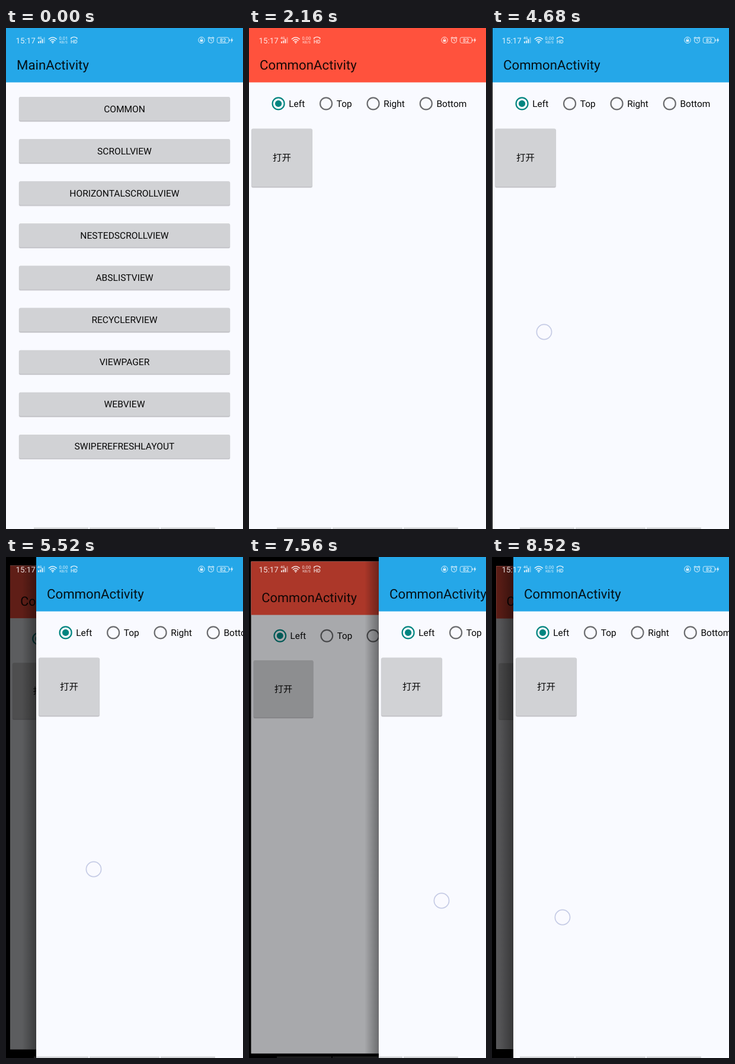
Recreate the animation shown at these times as an HTML page. Size 400 px wide and 844 px high, loop 8640 ms.

```html
<!DOCTYPE html>
<html lang="en">
<head>
<meta charset="utf-8">
<title>Page transitions</title>
<style>
html, body { margin: 0; width: 100%; height: 100%; overflow: hidden; background: #000; }
svg { display: block; width: 400px; height: 844px; }
text { font-family: Roboto, "Noto Sans CJK SC", "Noto Sans CJK", sans-serif; text-rendering: geometricPrecision; }
</style>
</head>
<body>
<svg id="stage" viewBox="0 0 400 844" xmlns="http://www.w3.org/2000/svg">
  <defs>
    <linearGradient id="edge">
      <stop offset="0" stop-color="#000" stop-opacity="0"/>
      <stop offset="1" stop-color="#000" stop-opacity=".36"/>
    </linearGradient>
  </defs>
</svg>
<script>
const LOOP = 8640, STEP = 120, W = 400, H = 844;
const OPEN_MS = 500, TAPS = [{ down: 950, open: 1592 }, { down: 3230, open: 3801 }];
const SWIPE_AT = 4440;
const stage = document.getElementById('stage');

function add(parent, tag, attrs, content) {
  const el = document.createElementNS('http://www.w3.org/2000/svg', tag);
  set(el, attrs);
  if (content !== undefined) el.textContent = content;
  parent.appendChild(el);
  return el;
}

function set(el, attrs) {
  for (const k in attrs) el.setAttribute(k, attrs[k]);
}

function show(el, on) {
  el.setAttribute('display', on ? 'inline' : 'none');
}

const clamp = v => Math.max(0, Math.min(1, v));

// ---- building blocks ----

function button(g, x, y, w, h, label) {
  const box = { x, y, width: w, height: h, rx: 2.2 };
  add(g, 'rect', { x: x - .7, y: y + .2, width: w + 1.4, height: h + 2, rx: 3, fill: '#000', opacity: .08 });
  add(g, 'rect', { x: x - .1, y: y + .6, width: w + .2, height: h + .8, rx: 2.6, fill: '#000', opacity: .17 });
  add(g, 'rect', { ...box, fill: '#d1d2d5' });
  const wave = add(g, 'g', {});
  add(g, 'text', { x: x + w / 2, y: y + h / 2 + 5.6, 'font-size': 15.55, 'text-anchor': 'middle', fill: '#080808' }, label);
  return { box, wave };
}

function ripple(btn, id, cx, cy, reach) {
  const clip = add(stage.querySelector('defs'), 'clipPath', { id });
  add(clip, 'rect', btn.box);
  set(btn.wave, { 'clip-path': `url(#${id})` });
  return { el: add(btn.wave, 'circle', { cx, cy, r: 0 }), reach };
}

function page(title, color) {
  const g = add(stage, 'g', {});
  add(g, 'rect', { width: W, height: H, fill: '#f9faff' });
  add(g, 'rect', { width: W, height: 91.6, fill: color });
  add(g, 'text', { x: 18, y: 69.6, 'font-size': 22.22, fill: '#000', 'fill-opacity': .9 }, title);
  return g;
}

function mainPage() {
  const g = page('MainActivity', '#25a7e8');
  const names = ['COMMON', 'SCROLLVIEW', 'HORIZONTALSCROLLVIEW', 'NESTEDSCROLLVIEW', 'ABSLISTVIEW',
    'RECYCLERVIEW', 'VIEWPAGER', 'WEBVIEW', 'SWIPEREFRESHLAYOUT'];
  const list = names.map((n, i) => button(g, 22.2, 116 + i * 71.11, 355.6, 40, n));
  return { g, first: list[0] };
}

function commonPage(color) {
  const g = page('CommonActivity', color);
  ['Left', 'Top', 'Right', 'Bottom'].forEach((name, i) => {
    const cx = [49.6, 130.1, 209.6, 298.8][i], on = i === 0;
    add(g, 'circle', { cx, cy: 127.4, r: 10, fill: 'none', stroke: on ? '#008580' : '#6b6c6f', 'stroke-width': 2.2 });
    if (on) add(g, 'circle', { cx, cy: 127.4, r: 5.6, fill: '#008580' });
    add(g, 'text', { x: cx + 17.6, y: 133.2, 'font-size': 15.55, fill: '#080808' }, name);
  });
  return { g, first: button(g, 4.4, 169.5, 102.2, 97.8, '打开') };
}

function statusBar() {
  const g = add(stage, 'g', { fill: '#fff', opacity: .85 });
  const label = (x, y, size, s, extra) => add(g, 'text', { x, y, 'font-size': size, ...extra }, s);
  const line = (d, w = 1) => add(g, 'path', { d, fill: 'none', stroke: '#fff', 'stroke-width': w, 'stroke-linecap': 'round' });

  label(16.6, 25.5, 13.3, '15:17');
  label(53, 19, 6, '4G', { 'font-weight': 500 });
  for (let i = 0; i < 4; i++) {
    const h = [3, 4.5, 7, 10][i];
    add(g, 'rect', { x: 54 + i * 3.2, y: 25.6 - h, width: 2, height: h, opacity: i < 3 ? 1 : .45 });
  }
  line('M72.3 18.6Q78.8 12.8 85.3 18.6', 1.5);
  line('M74.6 21.1Q78.8 17.4 83 21.1', 1.5);
  line('M76.8 23.4Q78.8 21.7 80.8 23.4', 1.4);
  add(g, 'circle', { cx: 78.8, cy: 25.2, r: 1.1 });
  const speed = label(97, 19.6, 7.6, '', { 'text-anchor': 'middle' });
  label(97, 26, 6, 'KB/S', { 'text-anchor': 'middle' });
  line('M109.8 18.2V16.9Q114.8 13.4 119.8 16.9V18.2', 1.4);
  label(114.8, 26, 8.6, 'HD', { 'text-anchor': 'middle', 'font-weight': 500 });

  add(g, 'circle', { cx: 330, cy: 20.4, r: 5.2, fill: 'none', stroke: '#fff' });
  add(g, 'rect', { x: 327.6, y: 19.8, width: 4.8, height: 3.4, rx: .5 });
  line('M328.6 19.8V18.8A1.4 1.4 0 0 1 331.4 18.8V19.8', .9);

  add(g, 'circle', { cx: 346, cy: 20.8, r: 4.4, fill: 'none', stroke: '#fff', 'stroke-width': 1.1 });
  line('M346 18.4V21L347.8 22');
  line('M341 17L343.2 15.3M351 17L348.8 15.3', 1.2);

  add(g, 'rect', { x: 356.3, y: 15.9, width: 19.8, height: 9.4, rx: 2.6, fill: 'none', stroke: '#fff', 'stroke-width': .9 });
  add(g, 'rect', { x: 376.6, y: 19, width: 1.2, height: 3.2 });
  label(366.2, 23.9, 9, '82', { 'text-anchor': 'middle', 'font-weight': 500 });
  add(g, 'path', { d: 'M381.8 15.8L378.8 21.2H380.8L380 25.4L383.4 19.6H381.3Z' });
  return speed;
}

// ---- scene ----

add(stage, 'rect', { width: W, height: H });
const home = mainPage();
const red = commonPage('#ff523d');
const scrim = add(stage, 'rect', { width: W, height: H });
const shadow = add(stage, 'rect', { y: 0, width: 24, height: H, fill: 'url(#edge)' });
const blue = commonPage('#25a7e8');
const waves = [ripple(home.first, 'clipA', 250, 143, 370), ripple(red.first, 'clipB', 86, 245, 133)];
const touches = [[250, 143], [87, 245]];
for (const [x, w] of [[47, 92], [141, 118], [261, 92]])
  add(stage, 'rect', { x, y: 841.4, width: w, height: 2.6, fill: '#6e6e6e', opacity: .27 });
const speed = statusBar();
const finger = add(stage, 'circle', { r: 12.6, fill: '#fff', 'fill-opacity': .15, stroke: '#9aa4d0', 'stroke-opacity': .55, 'stroke-width': 1.7 });

// ---- motion ----

// time, page offset, finger x, finger y
const DRAG = [
  [4440, 0, 78, 508],
  [4680, 1, 88, 512],
  [5040, 17, 108, 518],
  [5520, 51, 148, 526],
  [6720, 142, 253, 544],
  [7560, 219, 325, 579],
  [7920, 188, 290, 592],
  [8520, 36, 119, 607]
];

function drag(t, col) {
  const n = DRAG.length - 1;
  if (t >= DRAG[n][0]) return DRAG[n][col];
  let i = 0;
  while (i < n - 1 && t >= DRAG[i + 1][0]) i++;
  const slope = k => {
    const a = DRAG[Math.max(0, k - 1)], b = DRAG[Math.min(n, k + 1)];
    return (b[col] - a[col]) / (b[0] - a[0]);
  };
  const p = DRAG[i], q = DRAG[i + 1], d = q[0] - p[0], u = (t - p[0]) / d, v = 1 - u;
  return p[col] * v * v * (1 + 2 * u) + q[col] * u * u * (3 - 2 * u)
    + d * u * v * (v * slope(i) - u * slope(i + 1));
}

const slide = (g, x) => set(g, { transform: `translate(${x} 0)` });
const shrink = (g, k) => set(g, { transform: `translate(${W / 2} ${H / 2}) scale(${k}) translate(${-W / 2} ${-H / 2})` });
const entry = p => W * (1 + Math.cos(Math.PI * p)) / 2;
const recede = p => 1 - .04 * (1 - Math.pow(1 - p, 3.4));

function tapWave(t, tap, wave) {
  const press = clamp((t - tap.down - 100) / (tap.open - tap.down - 100));
  const after = t - tap.open;
  const grow = .6 * press + clamp(after / 220) * .4;
  const fade = .08 * clamp((t - tap.down) / 200) * clamp(1 - after / 400);
  set(wave.el, { r: wave.reach * grow, opacity: fade });
}

function draw(t) {
  const [p1, p2] = TAPS.map(tap => clamp((t - tap.open) / OPEN_MS));
  const swiping = t >= SWIPE_AT;
  const x = swiping ? Math.max(0, drag(t, 1)) : entry(p2);
  const backScale = swiping ? .96 + .04 * x / W : recede(p2);

  show(home.g, p1 < 1);
  show(red.g, p1 > 0);
  show(blue.g, p2 > 0);
  shrink(home.g, recede(p1));
  if (p2 > 0) shrink(red.g, backScale);
  else slide(red.g, entry(p1));
  slide(blue.g, x);

  show(scrim, swiping);
  show(shadow, swiping && x > 0);
  shrink(scrim, backScale);
  set(scrim, { opacity: .72 * (1 - x / W) });
  set(shadow, { x: x - 24 });

  TAPS.forEach((tap, i) => tapWave(t, tap, waves[i]));

  const i = t < 2400 ? 0 : 1, tap = TAPS[i];
  if (swiping) set(finger, { cx: drag(t, 2), cy: drag(t, 3), opacity: 1 });
  else set(finger, {
    cx: touches[i][0], cy: touches[i][1],
    opacity: t < tap.down ? 0 : clamp((t - tap.down + 60) / 200) * clamp((tap.open + 60 - t) / 100)
  });

  speed.textContent = t < 1440 ? '0.01' : '0.00';
}

function tick() {
  draw(Math.floor(performance.now() / STEP) * STEP % LOOP);
  requestAnimationFrame(tick);
}
tick();
</script>
</body>
</html>
```
